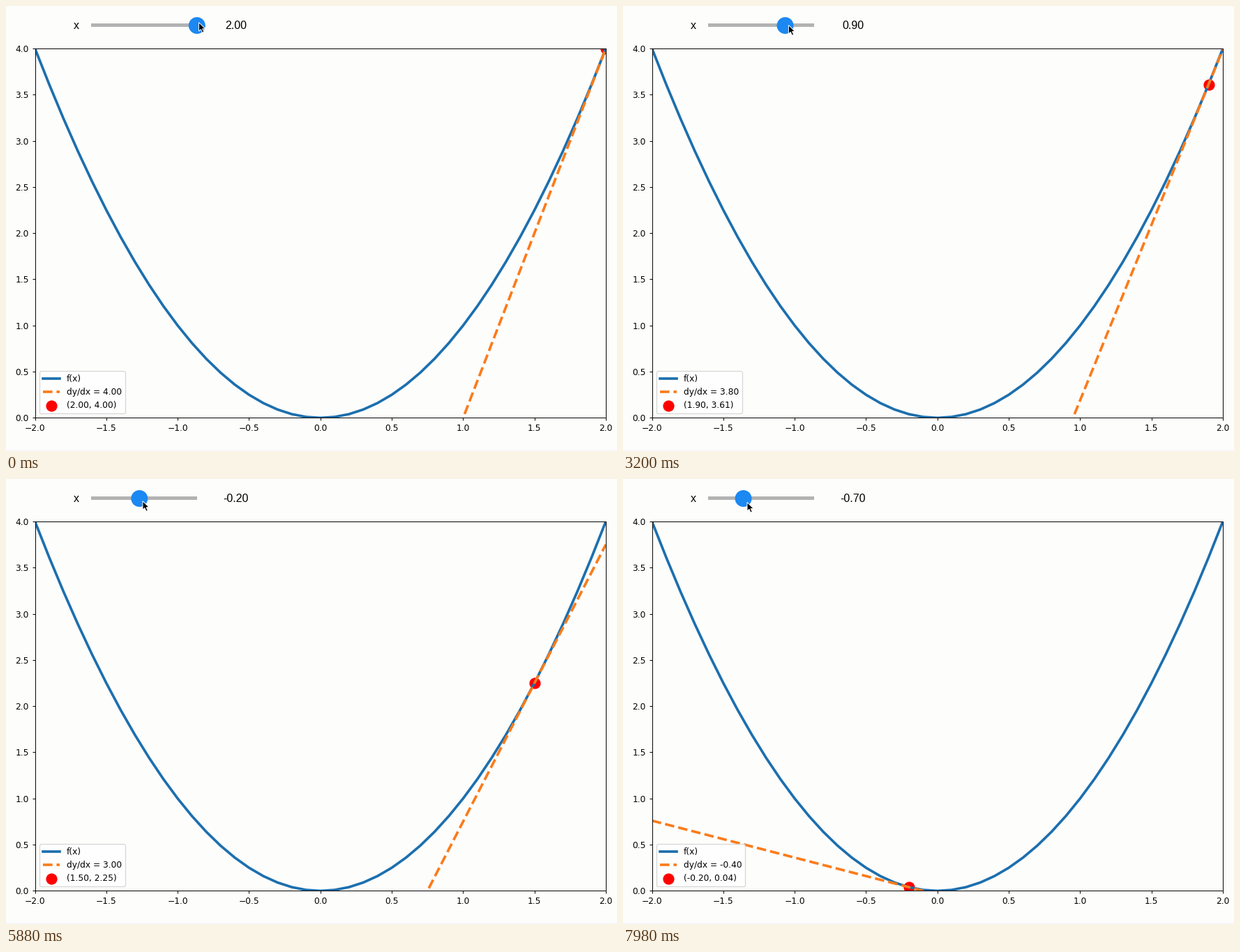
Recreate the animation shown at these times as a matplotlib script. Size 876 by 639 pixels, loop 8 s.

```python
import numpy as np
import matplotlib.pyplot as plt
from matplotlib.animation import FuncAnimation
from matplotlib.patches import Circle, Polygon, Rectangle

W, H, DPI = 876, 639, 88
LEFT, RIGHT, TOP, BOTTOM = 41.5, 860, 60.9, 591.4
STEP_MS, LOOP_MS = 40, 8000
PAPER, BLUE, ORANGE = "#fdfdfc", "#1c6fae", "#fb7b1a"

# pointer position over time; the knob snaps to steps of 0.1
POINTER_T = [0, 960, 2220, 4080, 5200, 6460, 7940]
POINTER_X = [276.5, 262, 253, 223.4, 203, 190, 178]
POINTER = np.array([(0, 0), (0, 12.6), (2.9, 9.9), (5, 14.7),
                    (7.3, 13.7), (5.2, 9.1), (9.2, 9)])

# the plot follows the slider late: (time, plotted x)
UPDATES = [(0, 2.0), (2000, 1.9), (3700, 1.5), (6100, 0.6), (7100, 0.2), (7720, -0.2)]

plt.rcParams["font.family"] = "DejaVu Sans"
fig = plt.figure(figsize=(W / DPI, H / DPI), dpi=DPI, facecolor=PAPER)

ax = fig.add_axes([LEFT / W, 1 - BOTTOM / H, (RIGHT - LEFT) / W, (BOTTOM - TOP) / H],
                  facecolor=PAPER)
ax.set(xlim=(-2, 2), ylim=(0, 4))
xs = np.linspace(-2, 2, 41)
ax.plot(xs, xs ** 2, color=BLUE, lw=3, label="f(x)")
tangent, = ax.plot([], [], "--", color=ORANGE, lw=3, label="dy/dx = 4.00")
dot = ax.scatter([2], [4], s=150, color="#ff0000", label="(2.00, 4.00)")
legend = ax.legend(loc="lower left")

ui = fig.add_axes([0, 0, 1, 1], facecolor="none")
ui.set(xlim=(0, W), ylim=(H, 0))
ui.axis("off")
ui.add_patch(Rectangle((0, H - 2), W, 2, color="#f8f8fc", lw=0))
ui.add_patch(Rectangle((122, 25.4), 151.5, 4.8, color="#b3b3b3", lw=0))
knob = ui.add_patch(Circle((274, 28), 12, color="#1c88f1", lw=0))
pointer = ui.add_patch(Polygon(POINTER, fc="black", ec="white", lw=0.8, joinstyle="miter"))


def header(x, s):
    return ui.text(x, 33.4, s, family="Liberation Sans", size=16 * 72 / DPI,
                   ha="center", va="baseline")


header(101, "x")
readout = header(329.5, "2.00")


def set_plot(x):
    slope, y = 2 * x, x * x
    ends = np.array([-2.0, 2.0])
    if slope > 0:
        # dashes are counted from just below the axis
        ends[0] = max(-2, x + (-0.232 - y) / slope)
    tangent.set_data(ends, y + slope * (ends - x))
    dot.set_offsets([(x, y)])
    texts = legend.get_texts()
    texts[1].set_text(f"dy/dx = {slope:.2f}")
    texts[2].set_text(f"({x:.2f}, {y:.2f})")


def draw(frame):
    t = frame * STEP_MS
    px = np.interp(t, POINTER_T, POINTER_X)
    value = round((px - 203) / 37.5, 1) + 0.0
    knob.center = (198.8 + 37.5 * value, 28)
    pointer.set_xy(POINTER + (px, 23.6 + 0.1 * (276.5 - px)))
    readout.set_text(f"{value:.2f}")
    set_plot([x for start, x in UPDATES if start <= t][-1])
    return []


anim = FuncAnimation(fig, draw, frames=LOOP_MS // STEP_MS, interval=STEP_MS,
                     init_func=lambda: draw(0), repeat=True, repeat_delay=0, blit=False)
plt.show()
```
